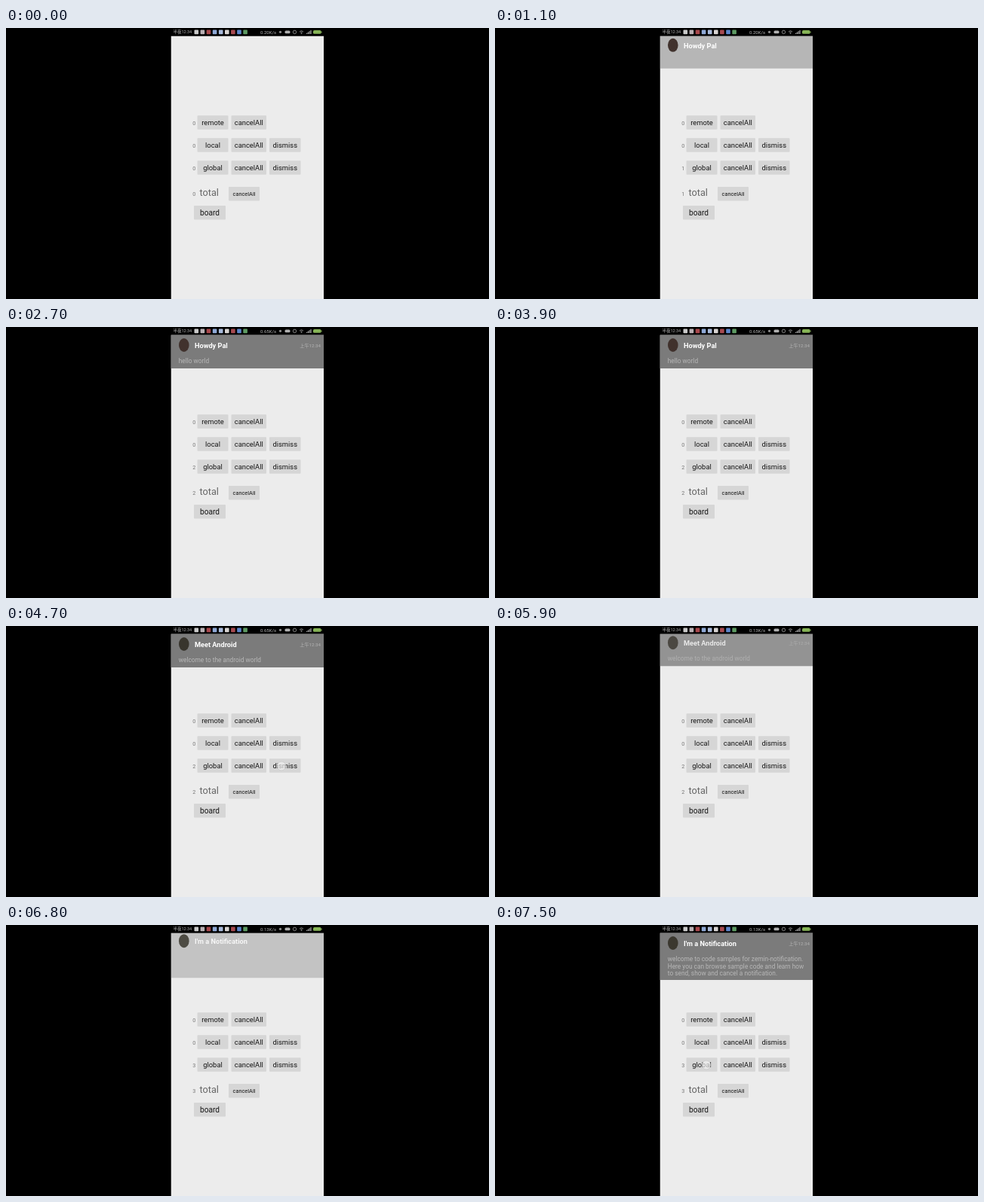
Animation, 640 px wide and 360 px high, one loop 8000 ms. Source, as an HTML page with a canvas:

```html
<!DOCTYPE html>
<html lang="en">
<head>
<meta charset="utf-8">
<style>
html, body { margin: 0; width: 100%; height: 100%; overflow: hidden; background: #000; }
canvas { display: block; }
</style>
</head>
<body>
<canvas id="stage" width="640" height="360"></canvas>
<script>
const ctx = document.getElementById('stage').getContext('2d');
const LOOP = 8000;
const SCREEN = { x: 218.5, y: 10.5, w: 202.5, h: 349.5 };
const FONT = 'Roboto, "Noto Sans CJK SC", "Noto Sans CJK JP", sans-serif';

const notes = [
  { title: 'Howdy Pal', body: ['hello world'], height: 44.5, icon: '#41322d' },
  { title: 'Meet Android', body: ['welcome to the android world'], height: 44.5, icon: '#38352d' },
  { title: "I'm a Notification", height: 62.5, icon: '#3b382f', body: [
    'welcome to code samples for zemin-notification.',
    'Here you can browse sample code and learn how',
    'to send, show and cancel a notification.'] }
];

// Touch marks: start, end, x
const taps = [[100, 700, 280], [2200, 2700, 280], [4600, 5800, 365], [6300, 6500, 280], [7400, 8000, 280]];

const clamp = v => Math.max(0, Math.min(1, v));
const ramp = (t, start, length) => clamp((t - start) / length);

function text(str, x, y, size, color, align = 'left', weight = 400) {
  ctx.font = `${weight} ${size}px ${FONT}`;
  ctx.textAlign = align;
  ctx.fillStyle = color;
  ctx.fillText(str, x, y);
}

function box(x, y, w, h, color, radius = 0) {
  ctx.fillStyle = color;
  ctx.beginPath();
  ctx.roundRect(x, y, w, h, radius);
  ctx.fill();
}

function disc(x, y, rx, ry, color) {
  ctx.fillStyle = color;
  ctx.beginPath();
  ctx.ellipse(x, y, rx, ry, 0, 0, 7);
  ctx.fill();
}

function arc(x, y, r, from, to) {
  ctx.beginPath();
  ctx.arc(x, y, r, from, to);
  ctx.stroke();
}

function button(label, x, y, w, size = 9.4) {
  box(x, y - 9.2, w, 18.5, '#d6d6d6', 0.8);
  text(label, x + w / 2, y + size * 0.36, size, '#161616', 'center');
}

function statusBar(t) {
  text('半夜12:34', 221.5, 7.3, 5.5, '#b4b4b4');
  ['#c9c9c9', '#b9b0b4', '#a8484c', '#8fa9d6', '#a9bbdc', '#d8d4d2', '#a84a50', '#5d86cc', '#5d9a62']
    .forEach((color, i) => box(249.5 + i * 8.1, 2.6, 5.6, 5.6, color, 0.8));
  const speed = t < 2700 ? '0.20' : t < 5800 ? '0.65' : '0.13';
  text(speed + 'K/s', 337, 7.5, 6, '#b4b4b4');

  disc(363.5, 5.3, 1.6, 1.6, '#8f8f8f');
  box(369.5, 3.5, 7, 3.8, '#b0b0b0', 1.5);
  ctx.strokeStyle = '#a8a8a8';
  ctx.lineWidth = 0.8;
  arc(382.5, 5.4, 2.2, 0, 7);
  for (const r of [1.7, 3.4]) arc(391.5, 7.3, r, Math.PI * 1.22, Math.PI * 1.78);
  disc(391.5, 7.2, 0.7, 0.7, '#a8a8a8');
  for (let i = 0; i < 4; i++) box(398 + i * 1.8, 6.7 - i * 1.2, 1.2, 1.3 + i * 1.2, '#a8a8a8');
  box(407, 3, 10.5, 4.8, '#86b456', 1.6);
  box(417.5, 4.4, 1, 2, '#86b456');
}

function controls(t) {
  const count = t < 700 ? 0 : t < 2700 ? 1 : t < 6500 ? 2 : 3;
  const rows = [['remote', 125.4, 0], ['local', 155.4, 0], ['global', 185.4, count]];
  rows.forEach(([name, y, value], i) => {
    text(value, 249.3, y + 3.2, 7.2, '#777', 'center');
    button(name, 253.5, y, 41);
    button('cancelAll', 298.5, y, 46.5);
    if (i) button('dismiss', 349, y, 41.5);
  });
  text(count, 249.3, 222.8, 7.2, '#777', 'center');
  text('total', 256.5, 223, 12.7, '#666');
  button('cancelAll', 295, 220.2, 41, 7.4);
  button('board', 249, 245.2, 42, 10.1);
}

function content(note, dy, titleAlpha, bodyAlpha) {
  ctx.globalAlpha = titleAlpha;
  disc(235.8, 24 + dy, 6.8, 9, note.icon);
  text(note.title, 250, 28.2 + dy, 9.2, '#fff', 'left', 700);
  ctx.globalAlpha = bodyAlpha;
  note.body.forEach((line, i) => text(line, 228.8, 47.7 + i * 9.8 + dy, 8.3, '#b8b8b8'));
  ctx.globalAlpha = 1;
}

function banner(t) {
  const start = t < 6400 ? 700 : 6500;
  const enter = ramp(t, start, 830);
  const leave = t < 6400 ? ramp(t, 5800, 480) : 0;
  if (!enter || leave === 1) return;

  const shown = 1 - leave;
  const dy = -17 * ((1 - enter) ** 4 + (1 - Math.cos(Math.PI * leave)) / 2);
  const titleIn = ramp(t, start, 350) * shown;
  const bodyIn = ramp(t, start + 450, 450) * shown;
  const first = start === 700 ? notes[0] : notes[2];

  ctx.globalAlpha = enter * shown;
  box(SCREEN.x, SCREEN.y - 20, SCREEN.w, first.height + 20 + dy, '#7b7b7b');

  const out = start === 700 ? ramp(t, 3900, 400) : 0;
  const swap = start === 700 ? ramp(t, 4250, 450) : 0;
  if (out < 1) content(first, dy, titleIn * (1 - out), bodyIn * (1 - out));
  if (swap) content(notes[1], dy, swap * shown, swap * shown);

  ctx.globalAlpha = bodyIn;
  text('上午12:34', 417, 27.2 + dy, 6.2, '#b4b4b4', 'right');
  ctx.globalAlpha = 1;
}

function touch(t) {
  const tap = taps.find(([from, to]) => t >= from && t < to);
  if (!tap) return;
  disc(tap[2], 186, 5.8, 5.8, 'rgba(245,245,245,.65)');
  ctx.strokeStyle = 'rgba(170,170,170,.35)';
  ctx.lineWidth = 0.7;
  arc(tap[2], 186, 5.8, 0, 7);
}

function draw(now) {
  const t = now % LOOP;
  box(0, 0, 640, 360, '#000');
  statusBar(t);
  ctx.save();
  ctx.beginPath();
  ctx.rect(SCREEN.x, SCREEN.y, SCREEN.w, SCREEN.h);
  ctx.clip();
  box(SCREEN.x, SCREEN.y, SCREEN.w, SCREEN.h, '#ececec');
  controls(t);
  banner(t);
  touch(t);
  ctx.restore();
  requestAnimationFrame(() => draw(performance.now()));
}
draw(performance.now());
</script>
</body>
</html>
```
